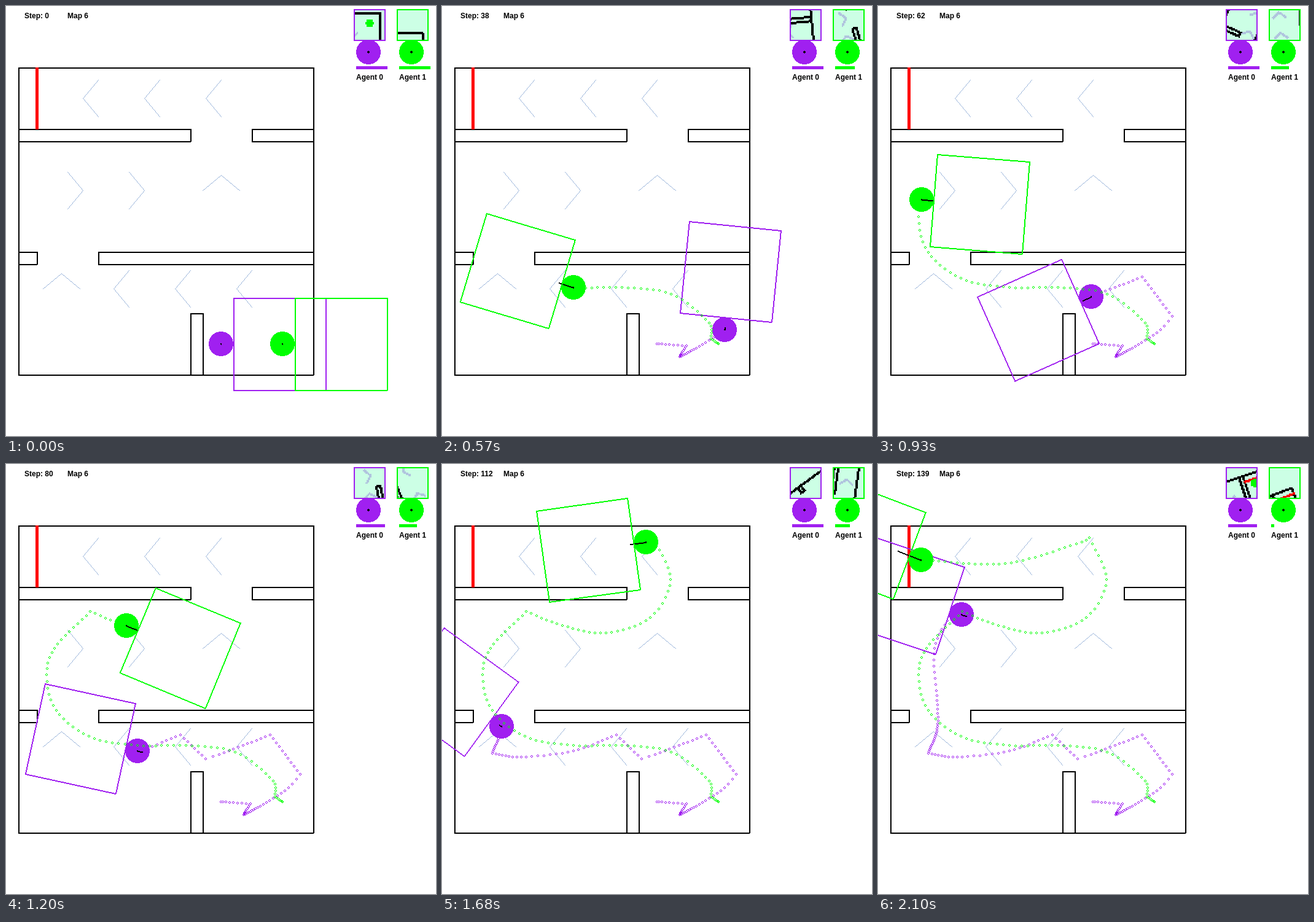
Write an HTML page with a canvas that moves like this. It is 700x700 px and loops after 2130 ms.

```html
<!DOCTYPE html>
<html lang="en">
<head>
<meta charset="utf-8">
<title>Two agents in a maze</title>
<style>
  html, body { margin: 0; width: 100%; height: 100%; overflow: hidden; background: #fff; }
  canvas, svg { position: absolute; left: 0; top: 0; width: 700px; height: 700px; }
  text { font: bold 12px "Liberation Sans", Arial, sans-serif; fill: #000; }
</style>
</head>
<body>
<canvas id="stage" width="700" height="700"></canvas>
<svg viewBox="0 0 700 700">
  <text id="step" x="30" y="20">Step: 0</text>
  <text x="100" y="20">Map 6</text>
  <text x="570" y="120">Agent 0</text>
  <text x="640" y="120">Agent 1</text>
</svg>
<script>
const TICK = 30, TICKS = 71, LAST = 139, FULL = 51, CRUISE = 20;
const BLACK = '#000', RED = '#f00', MARK = '#9fb8dc', SEEN_MARK = '#b0c4de', MINT = '#ccffe5';
const BOUNCE = true;
const ctx = document.getElementById('stage').getContext('2d');
const stepText = document.getElementById('step');

// path: [step, x, y], smooth except at a bounce; pose: [step, heading in degrees, thrust]
// drain: bar pixels lost per step and unit of thrust above cruising
const agents = [
  {
    color: '#a020f0', panel: 590, drain: 0,
    path: [
      [0, 350, 550], [4, 353, 550], [11, 398, 553, BOUNCE], [16, 390, 565], [21, 387, 571, BOUNCE],
      [30, 414, 557], [38, 460, 527], [41, 479, 505, BOUNCE], [51, 430, 441, BOUNCE],
      [62, 347, 473], [64, 325, 480, BOUNCE], [71, 284, 441, BOUNCE], [80, 214, 467],
      [89, 129, 477], [97, 82, 471, BOUNCE], [112, 97, 427], [120, 96, 377],
      [128, 92, 300], [136, 121, 241, BOUNCE], [139, 136, 245]
    ],
    pose: [[0, 0, 0], [22, -24, 41], [38, -84.3, 4], [62, -204, 15], [80, -167.7, -9],
           [112, -144, 4], [139, -161.6, -9]]
  },
  {
    color: '#00ff00', panel: 660, drain: 0.053,
    path: [
      [0, 450, 550], [4, 449, 549], [9, 438, 542, BOUNCE], [14, 435, 516], [22, 373, 469],
      [30, 293, 458], [38, 214, 458], [46, 135, 443], [54, 77, 393], [62, 71, 315],
      [73, 137, 240, BOUNCE], [80, 196, 263], [88, 267, 275], [96, 339, 250], [103, 372, 188],
      [110, 344, 120, BOUNCE], [112, 332, 127], [125, 207, 162], [139, 70, 156]
    ],
    pose: [[0, 0, 0], [14, -90, 32], [22, -178.5, 40], [38, -163.4, 25], [62, 4.6, 20],
           [80, 22.4, 20], [112, -188, 26], [139, -159.3, 40]]
  }
];

function box(x0, y0, x1, y1) {
  return [[x0, y0, x1, y0], [x1, y0, x1, y1], [x0, y1, x1, y1], [x0, y0, x0, y1]];
}

// side: 1 points left, -1 points right, 0 points up
function chevron(x, y, side) {
  const arms = side ? [[25 * side, -30], [25 * side, 30]] : [[-30, 25], [30, 25]];
  return arms.map(([dx, dy]) => [x, y, x + dx, y + dy]);
}

// One floor between two rooms, open from x0 to x1
function floor(y, x0, x1) {
  return [...box(20, y, x0, y + 20), ...box(x1, y, 500, y + 20)];
}

const walls = [
  ...box(20, 100, 500, 600), ...floor(200, 300, 400), ...floor(400, 50, 150),
  ...box(300, 500, 320, 600)
];
const goal = [50, 100, 50, 200];
const marks = [...chevron(350, 275, 0), ...chevron(90, 435, 0)];
for (let x = 0; x <= 200; x += 100) {
  marks.push(...chevron(125 + x, 150, 1), ...chevron(175 + x, 460, 1));
  if (x < 200) marks.push(...chevron(125 + x, 300, -1));
}

function spanAt(rows, t) {
  let i = 0;
  while (i < rows.length - 2 && rows[i + 1][0] <= t) i++;
  return i;
}

function placeAt(path, t) {
  const i = spanAt(path, t), a = path[i], b = path[i + 1];
  const prev = a[3] || !i ? a : path[i - 1];
  const next = b[3] || !path[i + 2] ? b : path[i + 2];
  const slope = (p, q, k) => (q[k] - p[k]) / (q[0] - p[0]);
  const h = b[0] - a[0], u = (t - a[0]) / h, v = 1 - u;
  return [1, 2].map(k => Math.round(
    a[k] * (1 + 2 * u) * v * v + b[k] * u * u * (3 - 2 * u) +
    h * u * v * (slope(prev, b, k) * v - slope(a, next, k) * u)));
}

function poseAt(rows, t) {
  const i = spanAt(rows, t), a = rows[i], b = rows[i + 1];
  const u = (t - a[0]) / (b[0] - a[0]);
  return [1, 2].map(k => a[k] + (b[k] - a[k]) * u);
}

// Every state of an agent's run, with the bar following its thrust
function run({ color, path, pose, drain }) {
  let used = 0;
  return Array.from({ length: LAST + 1 }, (_, t) => {
    const [x, y] = placeAt(path, t), [deg, thrust] = poseAt(pose, t);
    const r = deg * Math.PI / 180;
    used += drain * Math.max(0, thrust - CRUISE);
    const bar = Math.round(FULL - used - Math.max(0, -thrust) / 2);
    return { x, y, thrust, bar, cos: Math.cos(r), sin: Math.sin(r), color };
  });
}

for (const a of agents) a.states = run(a);

// Hard-edged line, thickened across its minor axis
function line(ends, w, color) {
  const [x0, y0, x1, y1] = ends.map(Math.trunc);
  const dx = x1 - x0, dy = y1 - y0;
  const n = Math.max(1, Math.abs(dx), Math.abs(dy));
  const steep = Math.abs(dy) > Math.abs(dx);
  ctx.fillStyle = color;
  for (let k = 0; k <= n; k++)
    ctx.fillRect(Math.round(x0 + dx * k / n), Math.round(y0 + dy * k / n), steep ? w : 1, steep ? 1 : w);
}

// Hard-edged disc, built from rows
function disc(x, y, r, color) {
  ctx.fillStyle = color;
  for (let d = -r; d < r; d++) {
    const half = Math.round(Math.sqrt(r * r - (d + 0.5) ** 2));
    ctx.fillRect(x - half, y + d, 2 * half, 1);
  }
}

function ring(x, y) {
  ctx.fillRect(x - 1, y - 2, 2, 1);
  ctx.fillRect(x - 1, y + 1, 2, 1);
  ctx.fillRect(x - 2, y - 1, 1, 2);
  ctx.fillRect(x + 1, y - 1, 1, 2);
}

function near(x, y, [x0, y0, x1, y1], r) {
  const dx = x1 - x0, dy = y1 - y0;
  const u = Math.max(0, Math.min(1, ((x - x0) * dx + (y - y0) * dy) / (dx * dx + dy * dy)));
  return Math.hypot(x - x0 - u * dx, y - y0 - u * dy) < r;
}

// Point f ahead of and l to the right of an agent
function ahead(s, f, l) {
  return [s.x + s.cos * f - s.sin * l, s.y + s.sin * f + s.cos * l];
}

function seen(x, y, other) {
  if (Math.hypot(x - other.x, y - other.y) < 20) return other.color;
  if (near(x, y, goal, 6)) return RED;
  if (walls.some(s => near(x, y, s, 6))) return BLACK;
  if (marks.some(s => near(x, y, s, 5.5))) return SEEN_MARK;
  return MINT;
}

function drawAgent(a, t) {
  const s = a.states[t];
  ctx.fillStyle = a.color;
  a.states.slice(0, t).forEach(p => ring(p.x, p.y));
  disc(s.x, s.y, 20, a.color);
  disc(s.x, s.y, 1, BLACK);
  line([s.x, s.y, ...ahead(s, s.thrust, 0)], 2, BLACK);
  const c = [[20, -75], [170, -75], [170, 75], [20, 75]].map(p => ahead(s, ...p));
  c.forEach((p, i) => line([...p, ...c[(i + 1) % 4]], 2, a.color));
}

function drawPanel(a, s, other) {
  const left = a.panel - 23, top = 6;
  for (let j = 0; j < 25; j++)
    for (let i = 0; i < 25; i++) {
      const y = top + 2 * j + 1;
      ctx.fillStyle = seen(...ahead(s, 20 + (54.6 - y) * 3, (i - 12) * 6), other);
      ctx.fillRect(left + 2 * i, top + 2 * j, 2, 2);
    }
  ctx.strokeStyle = a.color;
  ctx.lineWidth = 2;
  ctx.strokeRect(left, top, 50, 50);
  disc(a.panel, 75, 20, a.color);
  disc(a.panel, 75, 2, BLACK);
  ctx.fillStyle = a.color;
  ctx.fillRect(a.panel - 20, 98, s.bar, 5);
}

function draw(t) {
  ctx.fillStyle = '#fff';
  ctx.fillRect(0, 0, 700, 700);
  marks.forEach(m => line(m, 1, MARK));
  walls.forEach(w => line(w, 2, BLACK));
  ctx.fillStyle = RED;
  ctx.fillRect(48, 100, 5, 101);
  agents.forEach(a => drawAgent(a, t));
  agents.forEach((a, i) => drawPanel(a, a.states[t], agents[1 - i].states[t]));
  stepText.textContent = 'Step: ' + t;
}

const start = performance.now();
let shown = -1;

function play() {
  const tick = Math.floor((performance.now() - start) / TICK) % TICKS;
  if (tick !== shown) {
    shown = tick;
    draw(Math.min(2 * tick, LAST));
  }
  requestAnimationFrame(play);
}
play();
</script>
</body>
</html>
```
